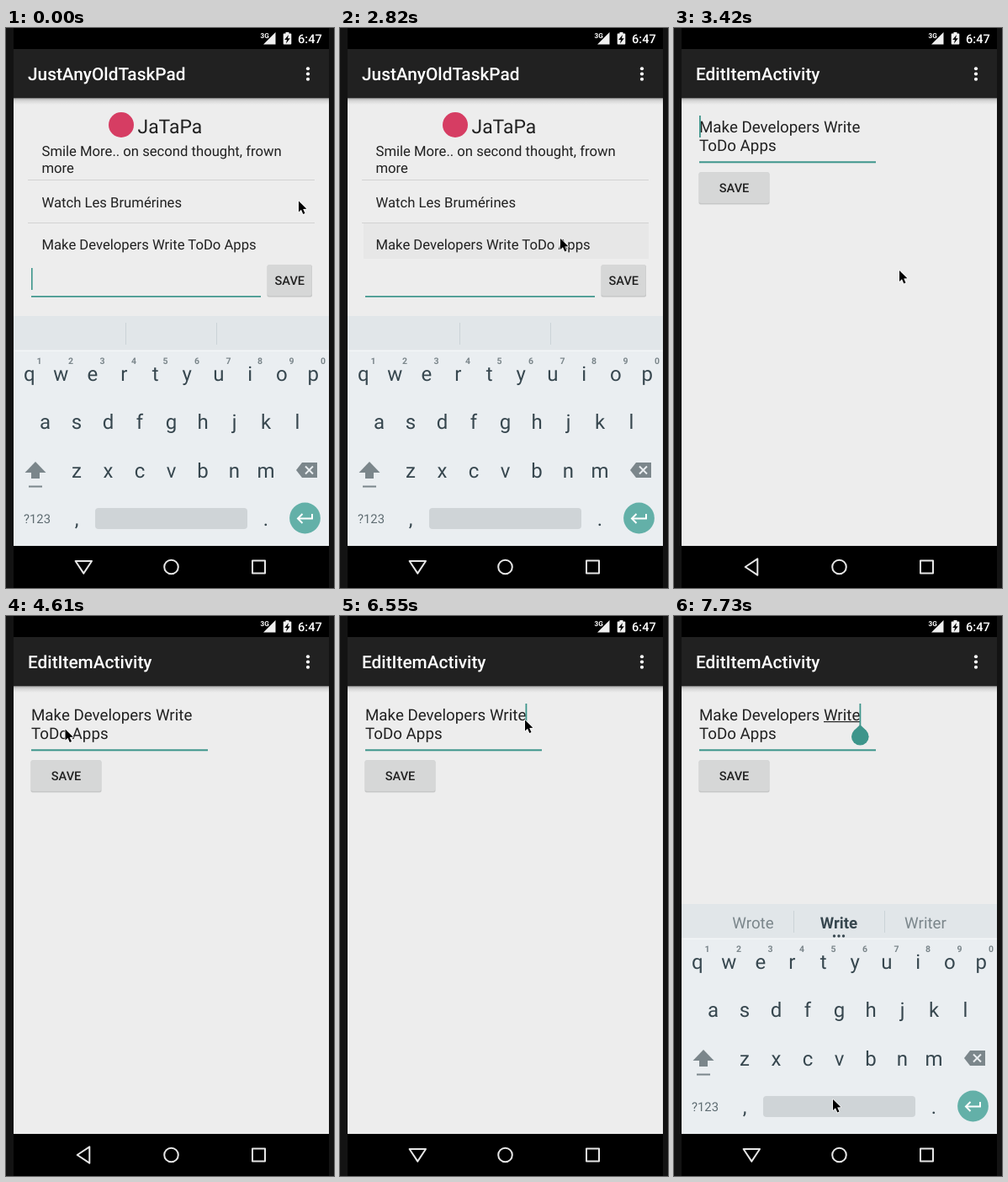
An HTML page with a canvas that plays this animation: 390x665 px, repeating every 8000 ms.

```html
<!DOCTYPE html>
<html lang="en">
<head>
<meta charset="utf-8">
<title>Task list demo</title>
<style>
html, body { margin: 0; width: 100%; height: 100%; overflow: hidden; background: #131313; }
canvas { display: block; width: 390px; height: 665px; }
</style>
</head>
<body>
<canvas id="stage"></canvas>
<script>
const W = 390, H = 665, LOOP = 8000, STEP = 148.6;
const canvas = document.getElementById('stage');
const g = canvas.getContext('2d');
const ratio = window.devicePixelRatio || 1;
canvas.width = W * ratio;
canvas.height = H * ratio;

const INK = '#212121', TEAL = '#3d958b', PAPER = '#ededed', LIGHT = '#f0f0f0';
const KEY = '#37474f', KEY_SOFT = '#7b868b', KEY_BACK = '#eaeef1';

// Moments of the story, counted in steps
const PRESS = 19, OPEN = 22, TAP = 44, SUGGEST = 47;

// Pointer glides: from step, to step, destination
const START = [348, 205.5];
const GLIDES = [
  [0, 7, 262, 250],
  [21, 23, 268, 288],
  [23, 31, 70.5, 134.5],
  [34, 42, 220, 123.5],
  [44, 52, 189, 574]
];

const clamp = v => Math.min(1, Math.max(0, v));
const easeOut = f => 1 - (1 - f) ** 3;
const blink = (k, start = 0) => (k - start) % 7 < 3;

function rect(x, y, w, h, color) {
  g.fillStyle = color;
  g.fillRect(x, y, w, h);
}

function round(x, y, w, h, r, color) {
  g.fillStyle = color;
  g.beginPath();
  g.roundRect(x, y, w, h, r);
  g.fill();
}

function dot(x, y, r, color) {
  g.fillStyle = color;
  g.beginPath();
  g.arc(x, y, r, 0, Math.PI * 2);
  g.fill();
}

function trace(points, closed) {
  g.beginPath();
  for (const [x, y] of points) g.lineTo(x, y);
  if (closed) g.closePath();
}

function poly(points, color) {
  trace(points, true);
  g.fillStyle = color;
  g.fill();
}

function line(points, color, width, closed = false) {
  trace(points, closed);
  g.strokeStyle = color;
  g.lineWidth = width;
  g.stroke();
}

function text(str, x, y, size, color = INK, weight = 400, align = 'left') {
  g.font = `${weight} ${size}px Roboto, sans-serif`;
  g.textRendering = 'geometricPrecision';
  g.textAlign = align;
  g.fillStyle = color;
  g.fillText(str, x, y);
}

function at(x, y, body) {
  g.save();
  g.translate(x, y);
  body();
  g.restore();
}

function statusBar() {
  rect(9, 0, 375, 25, '#000');
  poly([[306, 19.5], [320.5, 19.5], [320.5, 5]], LIGHT);
  rect(301, 4, 12, 9, '#000');
  text('3G', 302.5, 12, 8.2, '#fff', 700);
  round(329.7, 6.5, 9.6, 13, 1, LIGHT);
  rect(332.5, 5, 4, 2, LIGHT);
  poly([[336, 8], [331.2, 14], [334, 14], [333, 18.5], [337.8, 12.3], [335, 12.3]], '#000');
  text('6:47', 347, 18, 14.58, '#fff', 500);
}

function navBar(turn) {
  rect(9, 615, 375, 50, '#000');
  g.lineJoin = 'round';
  at(92.3, 640, () => {
    g.rotate(turn * Math.PI / 2);
    line([[-9.7, -7], [9.7, -7], [0, 7.6]], '#e6e6e6', 2, true);
  });
  g.strokeStyle = '#e6e6e6';
  g.lineWidth = 2;
  g.beginPath();
  g.arc(196.5, 640, 8.3, 0, Math.PI * 2);
  g.stroke();
  g.strokeRect(293, 632.5, 15, 15);
}

function appBar(title) {
  const shade = g.createLinearGradient(0, 83, 0, 91);
  shade.addColorStop(0, 'rgba(0,0,0,.3)');
  shade.addColorStop(.4, 'rgba(0,0,0,.1)');
  shade.addColorStop(1, 'rgba(0,0,0,0)');
  rect(9, 25, 375, 590, PAPER);
  rect(9, 83, 375, 8, shade);
  rect(9, 25, 375, 58.3, INK);
  text(title, 26, 62, 20.83, '#fff', 500);
  for (let i = -1; i <= 1; i++) dot(359, 54.5 + i * 6.25, 2.1, '#fff');
}

function button(x, y, w) {
  round(x - .5, y + .5, w + 1, 38, 2, '#c6c7c7');
  round(x, y, w, 37, 2, '#d6d7d7');
  text('SAVE', x + w / 2, y + 24, 14.58, INK, 500, 'center');
}

function listScreen(press, caret) {
  appBar('JustAnyOldTaskPad');
  dot(137, 115, 15, '#d63d63');
  text('JaTaPa', 156.5, 124.5, 22.9);
  rect(28, 232, 339, 42, `rgba(0,0,0,${.05 * press})`);
  for (const y of [180, 231]) rect(26, y, 341, 1, '#d2d2d2');
  text('Smile More.. on second thought, frown', 42.5, 152, 16.67);
  text('more', 42.5, 172, 16.67);
  text('Watch Les Brumérines', 42.5, 212.5, 16.67);
  text('Make Developers Write ToDo Apps', 42.5, 263, 16.67);
  rect(30, 318, 273, 1.7, TEAL);
  if (caret) rect(30, 285, 1.6, 26, TEAL);
  button(311, 281, 52.5);
}

function editScreen(k) {
  const tapped = k >= TAP;
  appBar('EditItemActivity');
  text('Make Developers Write', 30, 124, 18.75);
  text('ToDo Apps', 30, 146, 18.75);
  if (k >= SUGGEST) rect(178, 125, 43, 1.2, INK);
  rect(30, 158.3, 210, 2, TEAL);
  if (blink(k, tapped ? TAP : 0)) rect(tapped ? 220.5 : 30, 104, 1.8, 26, TEAL);
  button(30, 171, 83);
  if (k > TAP) {
    dot(221.3, 143.3, 10.3, TEAL);
    poly([[221.3, 129], [228.8, 136.3], [213.8, 136.3]], TEAL);
  }
}

function keyRows() {
  ['qwertyuiop', 'asdfghjkl', 'zxcvbnm'].forEach((row, r) => {
    const x = 196.5 - (row.length - 1) * 18.75;
    [...row].forEach((c, i) => text(c, x + i * 37.5, 418.7 + r * 57.4, 24, KEY, 400, 'center'));
  });
  for (let i = 0; i < 10; i++) {
    text((i + 1) % 10, 39.5 + i * 37.5, 399, 10.5, KEY_SOFT, 700, 'center');
  }
}

function shiftKey() {
  poly([[35, 515], [47.5, 528], [22.5, 528]], KEY_SOFT);
  rect(30, 527, 10, 8, KEY_SOFT);
  rect(27, 543.5, 16, 2, KEY_SOFT);
}

function deleteKey() {
  poly([[345, 525], [352, 516], [370, 516], [370, 534], [352, 534]], KEY_SOFT);
  for (const s of [-1, 1]) line([[356, 525 - 4.5 * s], [365, 525 + 4.5 * s]], KEY_BACK, 2);
}

function enterKey() {
  dot(355.5, 582, 18.4, '#63b0a8');
  g.lineJoin = 'miter';
  line([[364, 577], [364, 582.5], [348, 582.5]], '#fff', 2);
  line([[352.5, 577], [347, 582.5], [352.5, 588]], '#fff', 2);
}

function suggestions() {
  text('Wrote', 94, 370.5, 18.75, KEY_SOFT, 400, 'center');
  text('Write', 196, 370.5, 18.75, KEY, 700, 'center');
  text('Writer', 299, 370.5, 18.75, KEY_SOFT, 400, 'center');
  for (let i = -1; i <= 1; i++) dot(196 + i * 5.5, 380, 1.7, KEY);
}

function keyboard(k) {
  rect(9, 342, 375, 273, KEY_BACK);
  rect(9, 342, 375, 41, '#e1e6e9');
  rect(9, 382.5, 375, 1.5, '#f3f6f7');
  for (const x of [142, 250]) rect(x, 350, 1, 26, '#cbd3d7');
  if (k >= SUGGEST) suggestions();
  keyRows();
  shiftKey();
  deleteKey();
  text('?123', 37, 588, 14.8, '#5f6c72', 400, 'center');
  text(',', 84, 590.5, 24, KEY, 400, 'center');
  text('.', 309, 590.5, 24, KEY, 400, 'center');
  round(106, 570, 181, 25, 4, '#cfd4d7');
  enterKey();
}

function pointer(k) {
  let [x, y] = START;
  for (const [from, to, x1, y1] of GLIDES) {
    const f = easeOut(clamp((k - from) / (to - from)));
    x += (x1 - x) * f;
    y += (y1 - y) * f;
  }
  at(x, y, () => {
    const arrow = [[0, 0], [0, 13], [3, 10.3], [5.3, 15.6], [7.5, 14.6], [5.2, 9.6], [9.4, 9.3]];
    g.lineJoin = 'round';
    line(arrow, 'rgba(255,255,255,.85)', 1.6, true);
    poly(arrow, '#000');
  });
}

// Draws body lowered and faded by how much of it is shown, between the two bars
function layer(shown, drop, body) {
  if (shown <= 0) return;
  g.save();
  g.beginPath();
  g.rect(9, 25, 375, 590);
  g.clip();
  g.globalAlpha = shown;
  at(0, drop * (1 - shown), body);
  g.restore();
}

function draw(k) {
  const press = clamp((k - PRESS + 1) / 2);
  const opened = clamp((k - OPEN + 1) / 2);
  const keysUp = k < TAP ? 1 - opened : clamp((k - TAP) / 2);
  const turn = k < TAP ? clamp((k - PRESS) / 2) : 0;

  rect(0, 0, W, H, '#131313');
  layer(1, 0, () => listScreen(press, k < PRESS && blink(k)));
  layer(opened, 40, () => editScreen(k));
  layer(keysUp, 120, () => keyboard(k));
  statusBar();
  navBar(turn);
  pointer(k);
}

function tick() {
  const t = performance.now() % LOOP;
  g.setTransform(ratio, 0, 0, ratio, 0, 0);
  draw(Math.floor((t + 8) / STEP));
  requestAnimationFrame(tick);
}
tick();
</script>
</body>
</html>
```
